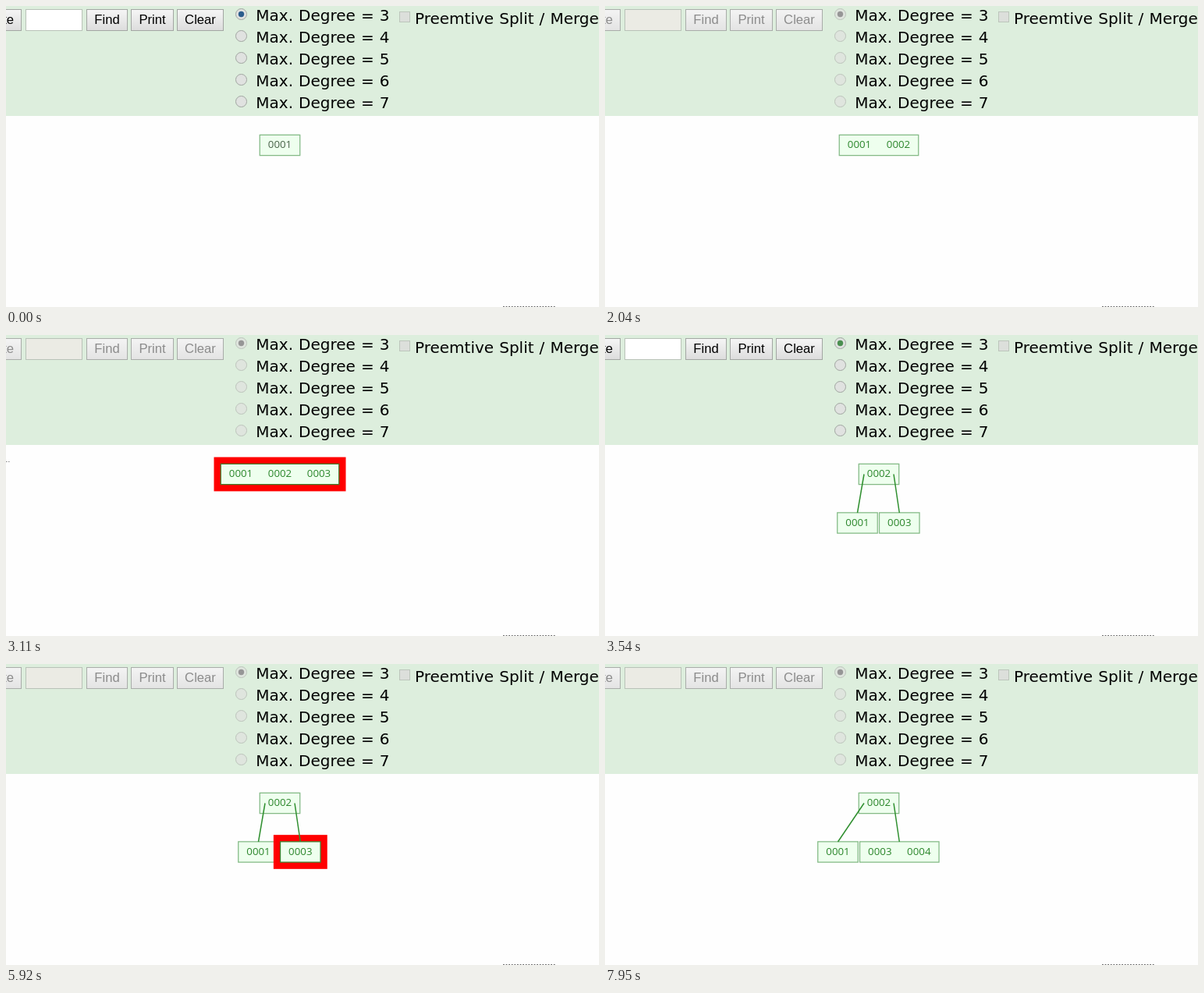
An HTML page with a canvas for the animation above (8000 ms loop, 760 by 386 pixels).

```html
<!DOCTYPE html>
<html>
<head>
<meta charset="utf-8">
<title>B-tree insertion</title>
<style>
html, body { margin: 0; width: 100%; height: 100%; overflow: hidden; background: #fefefe; }
canvas { display: block; }
</style>
</head>
<body>
<canvas id="stage" width="760" height="386"></canvas>
<script>
const ctx = document.getElementById('stage').getContext('2d');
const LOOP = 8000;
const ROOT_Y = 178.5, LEAF_Y = 241, CENTER = 351;
const LEFT = 323.5, FAR_LEFT = 298.5, RIGHT = 377.3;

const within = (t, a, b) => t >= a && t < b;
const progress = (t, a, b) => Math.min(1, Math.max(0, (t - a) / (b - a)));
const mix = (a, b, p) => a + (b - a) * p;

function box(x, y, w, h, fill, stroke, line = 1) {
  ctx.fillStyle = fill;
  ctx.fillRect(x, y, w, h);
  if (!stroke) return;
  ctx.strokeStyle = stroke;
  ctx.lineWidth = line;
  ctx.strokeRect(x, y, w, h);
}

function text(str, x, y, font, color, align = 'left') {
  ctx.font = font;
  ctx.fillStyle = color;
  ctx.textAlign = align;
  ctx.fillText(str, x, y);
}

// ---- control bar ----
function button(label, x, w, busy, labelX = x + w / 2) {
  const shade = ctx.createLinearGradient(0, 4, 0, 32);
  shade.addColorStop(0, busy ? '#f4f4f4' : '#f6f6f6');
  shade.addColorStop(1, busy ? '#e3e3e3' : '#dcdcdc');
  box(x + 0.5, 4.5, w - 1, 27, shade, busy ? '#a9aca9' : '#a3a6a3');
  text(label, labelX, 23, '16.67px "Liberation Sans", sans-serif', busy ? '#8c8c8c' : '#000', 'center');
}

function radio(y, busy, dot) {
  ctx.beginPath();
  ctx.arc(301.5, y, 7, 0, 7);
  ctx.fillStyle = busy ? '#dfe5de' : '#e0e2e0';
  ctx.fill();
  ctx.strokeStyle = busy ? '#bcc4bb' : '#a0a5a0';
  ctx.lineWidth = 1;
  ctx.stroke();
  if (!dot) return;
  ctx.beginPath();
  ctx.arc(301.5, y, 3.7, 0, 7);
  ctx.fillStyle = dot;
  ctx.fill();
}

function controls(t) {
  const busy = within(t, 230, 1390) || within(t, 2040, 3540) || within(t, 4680, 6540) || t >= 7950;
  const dot = busy ? '#969696' : t < 230 ? '#2b5d8c' : '#4a8f50';
  const font = '20px "DejaVu Sans", sans-serif';
  box(0, 0, 760, 141, '#ddeedd');
  button('Delete', -50, 70, busy, -14);
  box(25.5, 4.5, 72, 27, busy ? '#ebebe4' : '#fff', '#b9c2b8');
  button('Find', 103, 53, busy);
  button('Print', 160, 55, busy);
  button('Clear', 219, 60, busy);
  ctx.wordSpacing = '0.7px';
  for (let i = 0; i < 5; i++) {
    radio(10.5 + 28 * i, busy, i === 0 && dot);
    text('Max. Degree = ' + (3 + i), 320.3, 19 + 28 * i, font, '#000');
  }
  box(504.5, 7.5, 13, 13, '#dcdfdb', '#bcc5bb');
  text('Preemtive Split / Merge', 524, 23, font, '#000');
  ctx.wordSpacing = '0px';
}

// ---- tree ----
// The highlight pulses only while an operation runs.
function pulse(t) {
  const running = progress(t, 230, 1390) * 1160 + progress(t, 2040, 3540) * 1500 + progress(t, 4680, 6540) * 1860;
  const phase = (running + 290) / 840 % 2;
  return 1.25 * (3 + 4 * (1 - Math.abs(phase - 1)));
}

function node(keys, x, y, glow = 0, ink = '#2c862c') {
  const w = keys.length * 50 + 1.5, h = 26.3;
  const left = x - w / 2, top = y - h / 2;
  if (glow) box(left - glow, top - glow, w + 2 * glow, h + 2 * glow, '#f00');
  box(left, top, w, h, '#eeffee', glow ? '#3d7d2c' : '#82b984', 1.25);
  keys.forEach((key, i) => text('000' + key, x + (i - (keys.length - 1) / 2) * 50, 182.3 + y - ROOT_Y,
    '13.3px "Open Sans", "Noto Sans", sans-serif', ink, 'center'));
}

function edge(fromX, toX, toY, glow = 0) {
  const line = (width, color) => {
    ctx.beginPath();
    ctx.moveTo(fromX, ROOT_Y);
    ctx.lineTo(toX, toY - 13);
    ctx.lineWidth = width;
    ctx.strokeStyle = color;
    ctx.stroke();
  };
  if (glow) line(glow, '#f00');
  line(1.5, '#2f8f2f');
}

function tree(t) {
  const glow = (a, b) => within(t, a, b) ? pulse(t) : 0;
  if (t < 1030) return node([1], CENTER, ROOT_Y, glow(630, 1030), t < 630 ? '#4a624a' : undefined);
  if (t < 2790) return node([1, 2], CENTER, ROOT_Y, glow(2420, 2790));
  if (t < 3220) {
    node([1, 2, 3], CENTER, ROOT_Y, pulse(t));
    box(0, 162, 1.5, 1, '#888');
    box(3, 162, 1.5, 1, '#888');
    return;
  }
  const split = progress(t, 3165, 3540), spread = progress(t, 6165, 6540);
  const leftX = mix(mix(CENTER, LEFT, split), FAR_LEFT, spread);
  const rightX = mix(CENTER, RIGHT, split);
  const leafY = mix(ROOT_Y, LEAF_Y, split);
  node([1], leftX, leafY);
  node(t < 6165 ? [3] : [3, 4], rightX, leafY, glow(5770, 6165));
  node([2], CENTER, ROOT_Y, glow(5060, 5770));
  edge(332, leftX, leafY);
  edge(370, rightX, leafY, glow(5430, 5770));
}

function draw(now) {
  const t = now % LOOP;
  box(0, 0, 760, 386, '#fefefe');
  controls(t);
  tree(t);
  for (let x = 637; x < 703; x += 3.6) box(x, 385, 1.8, 1, '#666');
  requestAnimationFrame(draw);
}
requestAnimationFrame(draw);
</script>
</body>
</html>
```
